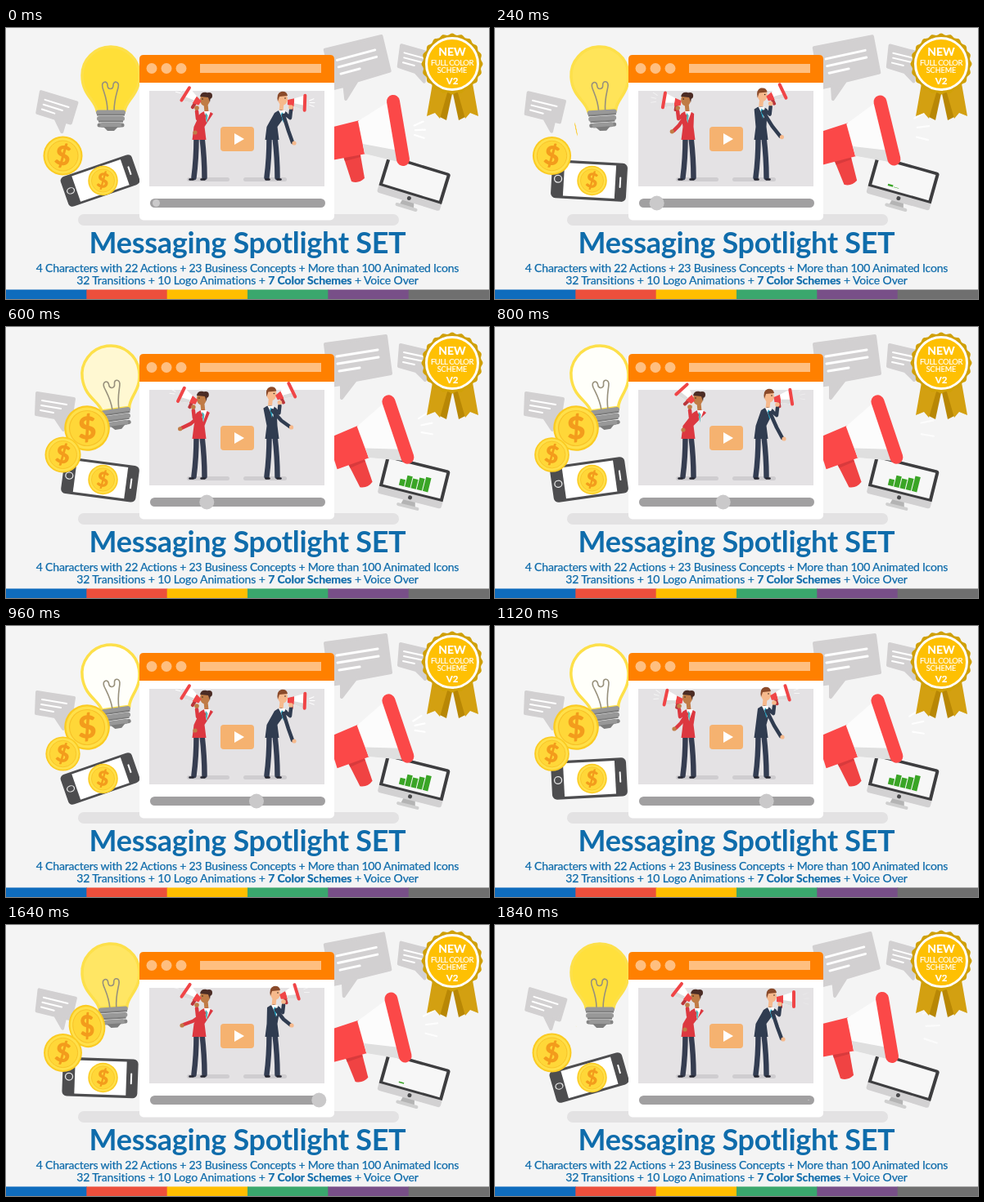
An HTML page for the animation above (1920 ms loop, 590x332 px).

```html
<!DOCTYPE html>
<html lang="en">
<head>
<meta charset="utf-8">
<title>Messaging Spotlight SET</title>
<style>
html, body { margin: 0; width: 100%; height: 100%; overflow: hidden; background: #f4f4f4; }
svg { display: block; width: 590px; height: 332px; }
text { font-family: Lato, "Open Sans", sans-serif; text-anchor: middle; }
.sub { font-size: 14px; fill: #0f6cab; stroke: #0f6cab; stroke-width: .25; }
.badge { fill: #fff; stroke: #fff; stroke-width: .2; }
.lines { stroke: #fff; fill: none; stroke-linecap: round; }
.limb { fill: none; stroke-linecap: round; stroke-linejoin: round; }
.bubble { stroke-linejoin: round; stroke-width: 4; fill: #d2d0d1; stroke: #d2d0d1; }
</style>
</head>
<body>
<svg viewBox="0 0 590 332">
  <defs>
    <g id="coin">
      <circle r="24" fill="#fbcb22"/>
      <circle r="22" fill="#ffe04a"/>
      <circle r="18.5" fill="#ffd738" stroke="#f8c228"/>
      <text y="11.500" font-size="33" font-weight="900" fill="#f39c1c" transform="rotate(10)">$</text>
    </g>
    <g id="horn">
      <rect x="3" y="3" width="4" height="8" rx="1.500" fill="#b9363b"/>
      <path d="M0-3 8-5V5L0 3Z" fill="#f04547"/>
      <path d="M8-5 20-9V9L8 5Z" fill="#fff"/>
      <path d="M8 1 20 3V9L8 5Z" fill="#dcdcdc"/>
      <rect x="19" y="-11" width="4" height="22" rx="2" fill="#f04547"/>
    </g>
    <g id="ribbon">
      <path d="M533 72 546 76 538 113 528 108Z" fill="#b88705"/>
      <path d="M521 68 540 76 530 111 524 104 514 108Z" fill="#d3a011"/>
    </g>
  </defs>

  <rect width="590" height="332" fill="#f4f4f4"/>
  <rect x="88" y="228" width="392" height="14" rx="7" fill="#e3e2e3"/>

  <g id="chatLeft">
    <path class="bubble" d="M38 81 83 88 79 114 72 113 70 126 60 111 37 107Z"/>
    <path class="lines" stroke-width="2" d="M44 90 74 95M43 96 67 100M42 102 58 105"/>
  </g>
  <g id="chatRight">
    <path class="bubble" d="M390 21 464 11 470 57 427 65 410 87 410 70 396 72Z"/>
    <path class="lines" stroke-width="3" d="M404 36 454 28M405 45 455 37M407 54 432 50"/>
  </g>
  <g id="chatSmall">
    <path class="bubble" d="M482 22 521 31 519 57 512 56 512 65 501 54 480 48Z"/>
    <path class="lines" stroke-width="2" d="M486 31 514 37M486 37 510 42M485 43 499 46"/>
  </g>

  <g id="bulb">
    <path id="glass" d="M111 101C109 88 93 82 93 58A35 35 0 0 1 163 58C163 82 147 88 145 101Z" stroke="#fde04a" stroke-width="3.500"/>
    <path class="limb" stroke="#97907c" stroke-width="1.600" d="M124 102C124 88 120 80 118 73C116 65 124 64 124 70S131 76 131 70 139 65 137 73 132 88 132 102"/>
    <g class="limb" stroke-width="6" stroke="#989898">
      <path d="M114 119 142 119" stroke-width="5" stroke="#848484"/>
      <path d="M113 103.500H143M114 111H142M118 119H138"/>
    </g>
    <path d="M119 121H137L132 126H124Z" fill="#7d7d7d"/>
    <path d="M111 106.500H145M113 114.500H143" stroke="#7d7d7d" stroke-width="2"/>
  </g>

  <g id="phone">
    <rect x="-46" y="-24.500" width="92" height="49" rx="6" fill="#4d4d4f"/>
    <rect x="-31" y="-21" width="63" height="42" fill="#fff"/>
    <circle cx="-38" r="4.500" fill="none" stroke="#e8e8e8" stroke-width="1.300"/>
    <path class="lines" stroke-width="2" d="M38-6V6"/>
  </g>
  <use href="#coin" transform="translate(118.500 187) scale(.76)"/>
  <use href="#coin" id="popCoin"/>
  <use href="#coin" id="sideCoin"/>

  <g id="monitor">
    <path d="M-7 25H7L9 33H-9Z" fill="#b4b4b4"/>
    <rect x="-14" y="32" width="28" height="4" rx="2" fill="#cfcfcf"/>
    <rect x="-40" y="-21" width="80" height="48" rx="3" fill="#d2d1d2"/>
    <path d="M-40 18V-18Q-40-21-37-21H37Q40-21 40-18V18Z" fill="#3d3d3f"/>
    <rect x="-36" y="-17.500" width="72" height="32.500" fill="#f7f7f7"/>
    <circle cy="22.500" r="2.500" fill="#4a4a4c"/>
    <path id="bars" fill="#3aa526"/>
  </g>

  <g id="bigHorn">
    <path d="M411 154 432 150 438 184Q431 191 422 188Z" fill="#f04343"/>
    <path d="M411 154 432 150 433 158 414 163Z" fill="#d83a3c"/>
    <path d="M392 123 432 113 440 154 398 162Z" fill="#fb4848"/>
    <path d="M430 114 468 90 483 165 438 154Z" fill="#fcfcfc"/>
    <path d="M436 142 479 150 483 165 438 154Z" fill="#dfdfdf"/>
    <path class="limb" d="M473 90 485 161" stroke="#fb4848" stroke-width="16"/>
    <path id="bigWaves" class="lines" stroke-width="2.200"/>
  </g>

  <rect x="163" y="33" width="238" height="202.500" rx="5" fill="#fff"/>
  <rect x="175" y="77" width="214" height="117" fill="#e4e2e4"/>
  <rect x="221" y="183" width="52" height="5" rx="2.500" fill="#cfcdd0"/>
  <rect x="290" y="183" width="53" height="5" rx="2.500" fill="#cfcdd0"/>
  <g id="people"></g>
  <path d="M163 67V38Q163 33 168 33H396Q401 33 401 38V67Z" fill="#ff8000"/>
  <g fill="#ffbf80">
    <circle cx="178" cy="49.500" r="6.500"/><circle cx="196" cy="49.500" r="6.500"/><circle cx="214" cy="49.500" r="6.500"/>
    <rect x="237" y="44" width="148" height="11"/>
  </g>
  <rect x="262" y="121" width="41" height="30" rx="4" fill="#f5b270"/>
  <path d="M279 129 291 136 279 143Z" fill="#fff"/>
  <rect x="176" y="209" width="214" height="11" rx="5.500" fill="#a1a0a1"/>
  <circle id="knob" cy="214.500" fill="#cac9ca"/>

  <use href="#ribbon"/>
  <use href="#ribbon" transform="translate(1091) scale(-1 1)"/>
  <path id="seal" fill="#d0a008"/>
  <circle cx="545" cy="44" r="31.500" fill="#fec003" stroke="#fff" stroke-width="3"/>
  <g class="badge">
    <text x="545" y="34" font-size="14" font-weight="700">NEW</text>
    <text x="545" y="45.500" font-size="9.500" letter-spacing="-.4">FULL COLOR</text>
    <text x="545" y="54.500" font-size="9">SCHEME</text>
    <text x="545" y="69" font-size="11.500" font-weight="700">V2</text>
  </g>

  <text x="295" y="275.500" font-size="36" font-weight="700" letter-spacing="-.3" fill="#0f6cab">Messaging Spotlight SET</text>
  <text class="sub" x="295" y="298.500" letter-spacing="-.2">4 Characters with 22 Actions + 23 Business Concepts + More than 100 Animated Icons</text>
  <text class="sub" x="295" y="314" letter-spacing="-.1">32 Transitions + 10 Logo Animations + <tspan font-weight="700">7 Color Schemes</tspan> + Voice Over</text>
  <g id="stripe"></g>
</svg>
<script>
const LOOP = 1920, BEAT = 960;
const $ = id => document.getElementById(id);
const set = (id, name, value) => $(id).setAttribute(name, value);
const move = (id, value) => set(id, 'transform', value);
const mix = (a, b, k) => a + (b - a) * k;
const smooth = (a, b, t) => {
  const u = Math.min(1, Math.max(0, (t - a) / (b - a)));
  return u * u * (3 - 2 * u);
};

// Smooth periodic curve through one value per key time
const KEYS = [0, 160, 440, 680, 800, 880];
function pose(p, values) {
  const n = KEYS.length;
  const at = j => {
    const turn = Math.floor(j / n), m = j - turn * n;
    return [KEYS[m] + BEAT * turn, values[m]];
  };
  const i = KEYS.filter(k => k <= p).length - 1;
  const [[ta, a], [tb, b], [tc, c], [td, d]] = [-1, 0, 1, 2].map(o => at(i + o));
  const span = tc - tb, u = (p - tb) / span;
  const m0 = (c - a) / (tc - ta) * span, m1 = (d - b) / (td - tb) * span;
  return b + u * (m0 + u * (3 * (c - b) - 2 * m0 - m1 + u * (2 * (b - c) + m0 + m1)));
}

const limb = (d, color, width) =>
  `<path class="limb" d="${d}" stroke="${color}" stroke-width="${width}"/>`;
const dot = (x, y, r, color) => `<circle cx="${x}" cy="${y}" r="${r}" fill="${color}"/>`;

// Three dashes fanning out from (x, y)
function waves(x, y, near, length) {
  return [-.42, -.05, .32].map(a => {
    const c = Math.cos(a), s = Math.sin(a);
    return `M${x + near * c} ${y + near * s}l${length * c} ${length * s}`;
  }).join('');
}

function person(side, hip, x, y, tilt, handX, handY, look, beat) {
  const mouthX = x + side * 6, mouthY = y + 4, shoulder = x - side * 2;
  const top = y + 15, gripX = mouthX + side * 4, gripY = mouthY + 6;
  const elbowX = (shoulder + handX) / 2 + side * 2, elbowY = (top + handY) / 2 + 5;
  const foot = f => limb(`M${f} 185.500h${side * 4}`, '#23242f', 2.5);
  const bun = side < 0 ? dot(x + 5, y - 5, 4, look.hair) : '';
  return limb(`M${hip - 3} 134Q${hip - 3} 160 ${hip - 6} 183`, look.legs, 6.5) +
    limb(`M${hip + 4} 134Q${hip + 7} 160 ${hip + 7} 183`, look.legs, 6.5) +
    foot(hip - 7) + foot(hip + 7) +
    limb(`M${x - side} ${y + 5}L${shoulder} ${top}`, look.skin, 5) +
    `<path d="M${shoulder - 8} ${top + 2}Q${shoulder} ${top - 5} ${shoulder + 8} ${top + 2}L${hip + 7} 121 ${hip + 9} 137H${hip - 8}L${hip - 6} 121Z" fill="${look.coat}"/>` +
    `<path d="M${shoulder - 3} ${top - 1}h8l${side * 2 - 3} 14Z" fill="#fff"/>` +
    `<path d="M${shoulder + side} ${top + 1}l2.500 3-1 10-2.500-10Z" fill="${look.tie}"/>` +
    bun + `<ellipse cx="${x}" cy="${y}" rx="6" ry="7.500" fill="${look.skin}"/>` +
    `<path d="M${x + side * 6} ${y - 4}Q${x + side * 5} ${y - 10} ${x - side * 2} ${y - 9}Q${x - side * 8} ${y - 7} ${x - side * 6} ${y + 3}L${x - side * 4} ${y - 3}Z" fill="${look.hair}"/>` +
    dot(x + side * 3, y - 1, .8, '#30251f') +
    `<g transform="translate(${mouthX} ${mouthY}) scale(${side} 1) rotate(${-tilt})"><use href="#horn"/>` +
    `<path class="lines" stroke-width="1" opacity="${1 - beat}" d="${waves(20, 0, 7 + 8 * beat, 6)}"/></g>` +
    limb(`M${shoulder + side * 6} ${top + 4}L${x + side * 9} ${y + 23} ${gripX} ${gripY + 4}`, look.coat, 4.5) +
    dot(gripX, gripY, 2.8, look.skin) +
    limb(`M${shoulder + side * 3} ${top + 5}L${elbowX} ${elbowY} ${handX} ${handY}`, look.coat, 4.5) +
    dot(handX + side * 2, handY + 1, 2.6, look.skin);
}

const WOMAN = { skin: '#c07c46', hair: '#4b2c25', coat: '#dc3840', legs: '#363d50', tie: '#54b5b8' };
const MAN = { skin: '#f6b98c', hair: '#8a4a2a', coat: '#303c50', legs: '#333d52', tie: '#1fa4c4' };

set('seal', 'd', 'M' + Array.from({ length: 180 }, (_, i) => {
  const a = i * Math.PI / 90, r = 36.5 + Math.cos(20 * a);
  return `${545 + r * Math.cos(a)} ${44 + r * Math.sin(a)}`;
}).join('L') + 'Z');
$('stripe').innerHTML = ['#0f6cbd', '#ec4f3c', '#ffbe00', '#3aa76d', '#784f88', '#6f6f6f']
  .map((c, i) => `<rect x="${i * 98.33}" y="320.500" width="99" height="12" fill="${c}"/>`).join('');

function draw(t) {
  const p = t % BEAT, beat = t % 480 / 480;
  const sway = smooth(0, 520, t) * (1 - smooth(1400, 1860, t));
  const glow = Math.sin(Math.PI * t / LOOP) ** 2;

  move('chatLeft', `rotate(${mix(8, 0, sway)} 62 100) translate(${mix(2, 0, sway)} 0)`);
  move('chatRight', `translate(432 48) rotate(${mix(-6, 0, sway)}) scale(${mix(.95, 1, sway)}) translate(-432 -48)`);
  move('chatSmall', `rotate(${mix(3, 0, sway)} 498 42)`);

  move('bulb', `rotate(${-8 * sway} 128 59)`);
  const lit = Math.min(1, glow * 1.15);
  set('glass', 'fill', `rgb(255,${mix(223, 255, lit)},${mix(56, 250, lit)})`);

  // The phone foreshortens as it tips away from level
  const tip = pose(p, [-19, -3, 14, 2, -8, -16]);
  move('phone', `translate(115 187) rotate(${tip}) scale(1 ${1 - .011 * Math.abs(tip)})`);
  move('sideCoin', `translate(69.500 156.500) scale(${mix(1, .88, glow)})`);
  const pop = smooth(60, 540, t) * (1 - smooth(1600, 1880, t));
  move('popCoin', `translate(99 124) rotate(-12) scale(${1.16 * pop ** 4} ${1.16 * pop})`);

  move('monitor', `translate(499 187) rotate(${mix(17, 14, sway)})`);
  set('bars', 'd', [8, 14, 12, 15, 19].map((h, i) => {
    const grow = smooth(150 + 60 * i, 400 + 60 * i, t);
    const shrink = smooth(1480 - 60 * i, 1700 - 60 * i, t);
    return `M${-17 + 7.5 * i} 11v${-h * grow * (1 - shrink)}h6.500V11Z`;
  }).join(''));

  move('bigHorn', `rotate(${-9 * sway} 479 126)`);
  set('bigWaves', 'd', waves(484, 126, 16 + 32 * beat, mix(12, 17, beat)));
  set('bigWaves', 'opacity', 1 - .4 * beat);

  $('people').innerHTML =
    person(-1, 235.5, pose(p, [243, 235, 232, 243, 248, 245]), 88,
      pose(p, [32, 12, 13, 34, 48, 38]),
      pose(p, [233, 221, 215, 217, 232, 234]), pose(p, [127, 125, 128, 122, 125, 127]), WOMAN, beat) +
    person(1, 324.5, pose(p, [338, 331, 318, 329, 335, 338]), pose(p, [87, 84, 80, 84, 85, 87]),
      pose(p, [-2, 17, 40, 17, 9, 0]),
      pose(p, [350, 349, 347, 347, 351, 350]), pose(p, [140, 135, 127, 122, 136, 139]), MAN, beat);

  const lead = t > 1870 ? t - LOOP : t;
  set('knob', 'cx', mix(183, 383, smooth(-50, 1700, lead)));
  set('knob', 'r', 9 * Math.min(1, Math.max(0, (lead + 100) / 200)) * (1 - smooth(1650, 1880, lead)));
}

function tick(now) {
  draw(Math.min(LOOP - 80, Math.floor(now % LOOP / 40) * 40));
  requestAnimationFrame(tick);
}
tick(performance.now());
</script>
</body>
</html>
```
